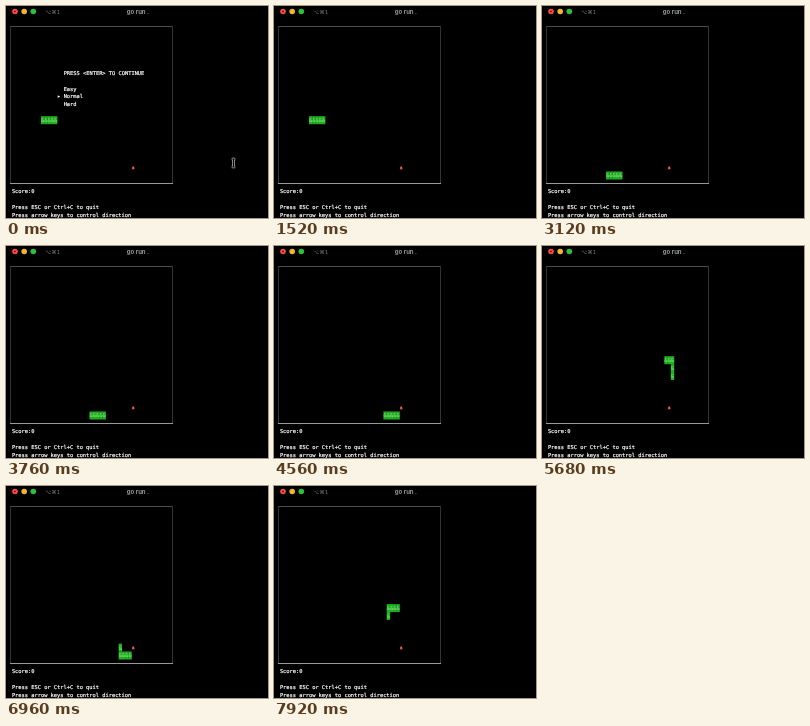
An HTML page with a canvas that plays this animation: 262 px wide and 212 px high, repeating every 8 s.

```html
<!DOCTYPE html>
<html lang="en">
<head>
<meta charset="utf-8">
<title>go run .</title>
<style>
  html, body { margin: 0; width: 100%; height: 100%; overflow: hidden; background: #000; }
  canvas { display: block; width: 262px; height: 212px; }
</style>
</head>
<body>
<canvas id="stage"></canvas>
<script>
const WIDTH = 262, HEIGHT = 212, LOOP = 8000, FRAME = 80;
const TICK = 100, TICK_OFFSET = 10, START_TICK = 15, START_TIME = 1520;
const CELL_W = 3.235, CELL_H = 7.9, ORIGIN_X = 35, ORIGIN_Y = 110.2;
const MONO = '5.37px "DejaVu Sans Mono", monospace';

const canvas = document.getElementById('stage');
const ctx = canvas.getContext('2d');
const scale = window.devicePixelRatio || 1;
canvas.width = WIDTH * scale;
canvas.height = HEIGHT * scale;
ctx.scale(scale, scale);

const colX = col => ORIGIN_X + col * CELL_W;
const rowY = row => ORIGIN_Y + row * CELL_H;

// Every cell the snake visits, tail first; its body is a five-cell window.
const track = [0, 1, 2, 3, 4].map(col => [col, 0]);
const step = { R: [1, 0], L: [-1, 0], D: [0, 1], U: [0, -1] };
for (const move of 'R5 D7 R20 U7 L5 D7 R3 U6 L3 D1'.split(' ')) {
  const [dx, dy] = step[move[0]];
  for (let i = 0; i < +move.slice(1); i++) {
    const [col, row] = track[track.length - 1];
    track.push([col + dx, row + dy]);
  }
}

function text(string, x, y, color, font) {
  ctx.font = font;
  ctx.fillStyle = color;
  ctx.fillText(string, x, y);
}

function print(string, col, row) {
  const x = colX(col), y = rowY(row) + 5.9;
  text(string, x, y, '#fff', MONO);
  // A hairline outline keeps the tiny glyphs bright.
  ctx.strokeStyle = '#fff';
  ctx.lineWidth = 0.2;
  ctx.strokeText(string, x, y);
}

function rect(x, y, width, height, color) {
  ctx.fillStyle = color;
  ctx.fillRect(x, y, width, height);
}

function dot(x, y, radius, color) {
  ctx.fillStyle = color;
  ctx.beginPath();
  ctx.arc(x, y, radius, 0, Math.PI * 2);
  ctx.fill();
}

function drawWindow() {
  rect(0, 0, WIDTH, HEIGHT, '#000');
  dot(9, 5.5, 2.8, '#fc4b45');
  dot(9, 5.5, 0.9, '#7c1512');
  dot(18.2, 5.5, 2.8, '#f5b32c');
  dot(27.3, 5.5, 2.8, '#28c23c');
  text('⌥⌘1', 39, 8, '#777', '5.5px "DejaVu Sans", sans-serif');
  text('go run .', 120.8, 8, '#999', 'bold 6px Inter, sans-serif');

  rect(4, 20, 163, 1, '#4c4c4c');
  rect(4, 20, 1, 157, '#333');
  rect(166, 20, 1, 157, '#333');
  rect(4, 177, 163, 1, '#999');
  print('Score:0', -9, 9);
  print('Press ESC or Ctrl+C to quit', -9, 11);
  print('Press arrow keys to control direction', -9, 12);
}

function drawMenu() {
  print('PRESS <ENTER> TO CONTINUE', 7, -6);
  ['Easy', 'Normal', 'Hard'].forEach((level, i) => print(level, 7, i - 4));
  print('▸', 5, -3);
}

function drawSnake(time) {
  const tick = Math.floor((time - TICK_OFFSET) / TICK);
  const tail = Math.max(0, tick - START_TICK);
  const body = track.slice(tail, tail + 5);
  for (const [col, row] of body) {
    rect(colX(col), rowY(row), CELL_W + 0.2, CELL_H + 0.1, '#1fb01f');
  }
  for (const [col, row] of body) {
    text('&', colX(col), rowY(row) + 5.9, '#8fdc8f', MONO);
  }
}

function drawFood() {
  const x = colX(28.5), y = rowY(6.5);
  ctx.fillStyle = '#e2555a';
  ctx.beginPath();
  ctx.moveTo(x, y - 2);
  ctx.lineTo(x + 1.5, y + 1.6);
  ctx.lineTo(x - 1.5, y + 1.6);
  ctx.fill();
  dot(x, y + 0.2, 1.1, '#e2555a');
}

function drawPointer(time) {
  const slide = Math.min(time / 160, 1);
  const x = 227.5 - 21.5 * slide, y = 157 - 24 * slide;
  for (const [color, width] of [['#bbb', 2.4], ['#000', 1]]) {
    ctx.strokeStyle = color;
    ctx.lineWidth = width;
    ctx.beginPath();
    for (const end of [-4, 4]) {
      ctx.moveTo(x - 1.8, y + end);
      ctx.lineTo(x + 1.8, y + end);
    }
    ctx.moveTo(x, y - 4);
    ctx.lineTo(x, y + 4);
    ctx.stroke();
  }
}

const begin = performance.now();

function render() {
  const elapsed = performance.now() - begin;
  const time = Math.floor((elapsed % LOOP) / FRAME) * FRAME;
  drawWindow();
  if (time < START_TIME) drawMenu();
  drawFood();
  drawSnake(time);
  if (time < 960) drawPointer(time);
  requestAnimationFrame(render);
}

render();
</script>
</body>
</html>
```
